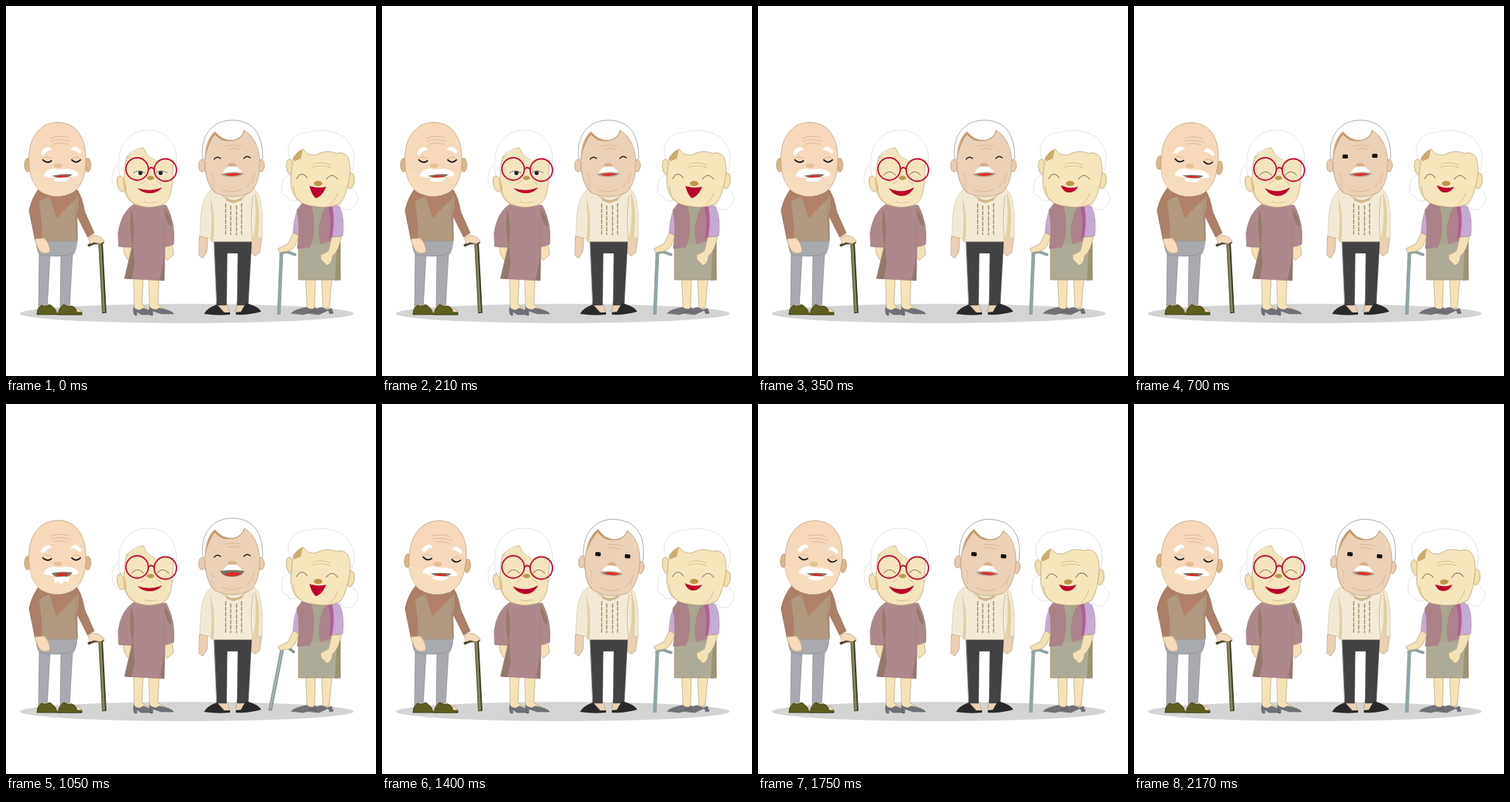
Animation, 512 px wide and 512 px high, one loop 2450 ms. Source, as an HTML page:

```html
<!DOCTYPE html>
<html lang="en">
<head>
<meta charset="utf-8">
<title>Four grandparents</title>
<style>
  html, body { margin: 0; width: 100%; height: 100%; overflow: hidden; background: #fff; }
  svg { display: block; width: 100vw; height: 100vh; }
  path, ellipse, circle { stroke-linecap: round; stroke-linejoin: round; }
  .edge { stroke: #b09a70; stroke-width: .7; }
  .line { fill: none; stroke: #a58a62; stroke-width: .8; }
  .wrinkle { fill: none; stroke: #d3b68e; stroke-width: .9; }
  .lash { fill: none; stroke: #1d1b18; stroke-width: 1.8; }
  .squint { fill: none; stroke: #85795a; stroke-width: 1.1; }
  .white { fill: #fff; }
  .hair { fill: #fff; stroke: #dcdcdc; stroke-width: .8; }
  .red { fill: #bd0029; }
  .shaft { fill: none; stroke-linecap: butt; }
</style>
</head>
<body>
<svg viewBox="0 0 512 512">
  <ellipse cx="250" cy="425.5" rx="231" ry="13.3" fill="#d4d4d4"/>

  <!-- Man with a cane -->
  <g>
    <g fill="#a8aab0" stroke="#85878d" stroke-width=".7">
      <path d="M42 321L98 322Q99 337 92 345L88 416H75L76 346L61 345L57 416H45L46 344Q41 334 42 321Z"/>
      <path d="M47 344Q68 349 91 343" fill="none"/>
    </g>
    <path d="M46 414H57L72 422V426H46ZM76 414H88L104 421V426H76Z" fill="#f5dabb" class="edge"/>
    <g fill="#5c5e20" stroke="#30320e" stroke-width=".8">
      <path d="M43 426Q43 418 49 414Q55 417 60 413Q68 417 70 424L72 427H43Z"/>
      <path d="M72 427Q73 417 80 413Q87 417 91 415Q98 418 98 424L105 424V427Z"/>
    </g>
    <path d="M48 250Q36 263 32 283L40 323L52 322L49 297L48 325L99 325L98 290L113 320L122 314L109 285Q104 258 96 252Z" fill="#ab7f68" stroke="#8d6b57" stroke-width=".7"/>
    <path d="M46 272Q50 266 60 264L70 293L100 263Q101 280 97 292L99 325H48L49 297Z" fill="#b19a81"/>
    <path d="M60 262L71 293L101 259Q75 270 60 262Z" fill="#b08168"/>
    <path d="M46 270Q41 291 49 301L50 322M98 263Q94 288 98 324" class="line"/>
    <path d="M40 322L53 321Q61 329 61 340Q56 344 49 341Q42 335 40 322Z" fill="#f5dabb" class="edge"/>
    <path class="shaft" d="M131 329L136 425" stroke="#35351f" stroke-width="6"/>
    <path class="shaft" d="M130.5 329L135.5 424" stroke="#88845c" stroke-width="3.4"/>
    <path d="M115 331L122 328L134 327" fill="none" stroke="#4b4a2d" stroke-width="4"/>
    <path d="M114 321L121 317Q132 318 136 326L130 329L122 327L117 329Z" fill="#f5dabb" class="edge"/>
    <g data-tilt="0 0 5 0 5 5" data-pivot="70 280">
      <g fill="#d9b588" class="edge">
        <ellipse cx="30" cy="220" rx="4.5" ry="9.5"/>
        <ellipse cx="113" cy="220" rx="4.5" ry="9.5"/>
      </g>
      <path d="M72 161C96 161 108 180 110 203C112 228 107 249 92 258Q71 269 50 258C35 248 30 227 32 203C34 180 48 161 72 161Z" fill="#f5d9ba" class="edge"/>
      <path d="M33 226Q48 234 71 232Q94 234 109 226Q105 249 92 258Q71 268 50 258Q36 249 33 226Z" fill="#f5dcbd"/>
      <path d="M61 183Q74 178 87 182M62 187Q75 183 89 187M65 191Q75 188 85 191" class="wrinkle"/>
      <path class="white" d="M48 205Q50 196 59 195L64 199Q56 200 53 206ZM105 203Q102 195 93 195L89 199Q98 200 102 205Z"/>
      <path class="lash" d="M51 213Q57 219 63 214M91 213Q97 219 103 213"/>
      <path d="M50 211Q57 207 63 211M91 211Q97 207 103 211" class="wrinkle"/>
      <ellipse cx="72" cy="221" rx="6" ry="3.3" fill="#e6c195"/>
      <path class="white" d="M52 235Q54 226 66 225Q75 227 84 225Q98 226 101 234Q91 238 78 235Q64 240 52 235Z"/>
      <g data-on="012 45">
        <path d="M63 235Q77 232 92 233Q87 238 77 238Q70 238 63 235Z" fill="#777568"/>
        <path d="M68 236Q77 233 87 235Q78 239 68 236Z" fill="#d92a26"/>
        <path class="white" d="M65 240Q77 236 88 238Q86 244 76 243Q69 244 65 240Z"/>
      </g>
      <g data-on="3">
        <path d="M63 234Q77 231 92 233Q89 240 77 240Q67 240 63 234Z" fill="#77786e"/>
        <path d="M68 236Q77 232 87 235Q79 241 68 236Z" fill="#dc2a26"/>
        <path class="white" d="M66 241Q77 237 88 240L86 247L81 245L77 249L72 246L68 248Z"/>
      </g>
    </g>
  </g>

  <!-- Woman with glasses -->
  <g>
    <path d="M177 376H190L188 413L199 422H178ZM198 376H212L210 413L222 421H199Z" fill="#f5e3b7" class="edge"/>
    <path d="M177 417Q183 424 190 418Q202 422 203 427H187L181 423V428H178Q175 423 177 417ZM199 417Q206 423 212 418Q229 421 232 426H215L203 422V428H200Q197 423 199 417Z" fill="#707078" stroke="#5d5e66" stroke-width=".6"/>
    <path d="M163 333H174L176 351L170 353L164 344ZM220 333L230 332L232 344L223 352L219 347Z" fill="#f5e0b6" class="edge"/>
    <path d="M176 275Q159 286 155 315L156 333L174 334L164 377L219 380L220 333L232 330Q235 301 222 276Z" fill="#ad888d" stroke="#98807a" stroke-width=".7"/>
    <path d="M173 281Q180 300 176 330L178 357L174 378L164 377L175 334Q170 305 173 281Z" fill="#92796a"/>
    <path d="M219 279Q228 289 229 306Q221 301 219 279ZM219 330L219 380L212 379Q219 358 219 330Z" fill="#92796a"/>
    <path class="line" d="M173 284Q179 309 174 335M220 282Q216 306 220 333"/>
    <path class="hair" d="M164 218Q149 217 147 233Q145 256 164 258Z"/>
    <path class="hair" d="M157 232C151 194 168 172 197 172C223 172 237 189 236 219L232 245H164Z"/>
    <ellipse cx="159" cy="246" rx="5" ry="11" transform="rotate(-12 159 246)" fill="#f3e0b4" class="edge"/>
    <path d="M164 228Q163 202 188 195Q204 210 232 213L230 246Q228 275 210 277Q194 281 177 274Q162 261 163 238Z" fill="#f5e5bc" class="edge"/>
    <path d="M163 237Q169 253 166 260Q174 274 187 276Q172 276 165 260Q161 249 163 237Z" fill="#dfc28d"/>
    <path class="white" d="M163 212Q169 189 191 181Q221 185 235 214Q216 209 206 214Q195 209 190 196Q174 201 163 212Z"/>
    <path d="M165 211Q175 198 190 196Q195 209 206 213" class="wrinkle"/>
    <g data-on="0">
      <ellipse cx="185" cy="231" rx="7" ry="3.4" fill="#fffaf0"/>
      <ellipse cx="215" cy="231" rx="7" ry="3.4" fill="#fffaf0"/>
      <circle cx="186" cy="231" r="2.9" fill="#26211c"/>
      <circle cx="214" cy="231" r="2.9" fill="#26211c"/>
      <path d="M177 231Q185 225 192 231M207 231Q215 225 223 231" class="squint"/>
    </g>
    <path data-on="12345" class="squint" d="M174 234Q182 225 190 234M209 234Q217 225 225 234"/>
    <ellipse cx="200" cy="238" rx="5" ry="3" fill="#bd994f"/>
    <path class="wrinkle" d="M187 246Q190 243 193 243M208 243Q213 244 215 247M191 271Q199 274 209 271"/>
    <path data-on="0 3" class="red" d="M182 252Q199 258 216 251Q210 259 199 259Q188 259 182 252Z"/>
    <path data-on="12 45" class="red" d="M181 252Q199 261 216 251Q210 263 198 263Q187 262 181 252Z"/>
    <g fill="none" stroke="#c10735" stroke-width="1.8">
      <circle cx="181.5" cy="225.5" r="15.5"/>
      <circle cx="220.5" cy="227" r="15.5"/>
      <path d="M197 226Q201 221 205 226"/>
    </g>
  </g>

  <!-- Man in a pullover -->
  <g>
    <path d="M268 319L279 321L278 340L272 349L267 345ZM340 321L354 319L351 341L345 346L338 341Z" fill="#ebd0b4" class="edge"/>
    <path d="M292 410H305L310 425H284ZM320 410H333L338 424H318Z" fill="#ead0b4" class="edge"/>
    <path d="M288 322H340L335 414H320L321 342H306L305 414H292Z" fill="#424245" stroke="#39393b" stroke-width=".6"/>
    <path d="M274 426Q278 418 292 413L302 424L310 424V427Q292 429 274 426ZM318 424L325 423L332 411Q350 416 353 423Q336 428 318 427Z" fill="#29292a"/>
    <path d="M284 254Q272 264 270 285L268 318L283 322L284 326H341L342 321L354 321Q357 288 350 262L343 252Z" fill="#f2ead7" stroke="#d3c5a4" stroke-width=".7"/>
    <path d="M282 264Q291 287 287 325H283Q286 288 282 264ZM344 258Q353 273 349 320L342 321Q348 289 344 258Z" fill="#e0d0a5"/>
    <path d="M342 263Q337 293 341 324M299 263Q315 277 334 260" class="wrinkle"/>
    <path class="shaft" d="M304 273V317M311 276V317M319 276V317M326 273V317" stroke="#a8946f" stroke-width="1.6" stroke-dasharray="6 1.5"/>
    <path d="M302 262Q315 276 331 261L326 269L315 273L306 270Z" fill="#d0b78d"/>
    <g data-tilt="0 0 0 0 5.5 5.5" data-pivot="300 277">
      <path d="M272 208C269 179 286 158 313 158C342 158 356 178 355 211L350 230H276Z" fill="#fff" stroke="#949496" stroke-width=".8"/>
      <ellipse cx="271" cy="221" rx="4.5" ry="8.5" fill="#e8cbb0" class="edge"/>
      <ellipse cx="353" cy="221" rx="4.5" ry="8.5" fill="#e8cbb0" class="edge"/>
      <path d="M275 212Q276 185 289 174Q301 188 315 186Q327 183 330 172Q348 183 351 211Q352 246 338 258Q313 270 289 258Q275 246 275 212Z" fill="#ebd1b8" class="edge"/>
      <path d="M276 209Q278 184 289 174Q299 186 310 187Q299 189 289 178Q280 189 276 209ZM277 232Q279 249 290 257Q280 252 277 232Z" fill="#c59a68"/>
      <path d="M301 184Q308 187 315 186Q327 183 330 172" class="line"/>
      <path class="wrinkle" d="M304 194Q315 191 326 194M307 198Q315 196 323 198M283 231Q287 234 287 240M284 244L288 249M344 232Q340 238 341 245M338 244L334 251M299 254Q313 260 326 254"/>
      <path data-on="01 3" class="lash" d="M288 212Q292 207 297 211M329 211Q333 206 338 210" style="stroke-width:1.4"/>
      <g data-on="2 45" fill="#17140f">
        <rect x="288.5" y="205.5" width="7.5" height="5.5" rx="1.5"/>
        <rect x="329.5" y="204.5" width="7.5" height="5.5" rx="1.5"/>
      </g>
      <ellipse cx="313" cy="220" rx="6" ry="2.8" fill="#d3b18d"/>
      <path class="white" d="M300 231Q303 222 313 222Q323 222 326 230Q314 228 300 231Z"/>
      <g data-on="012 45">
        <path d="M297 233Q312 228 330 232Q323 237 313 236Q304 237 297 233Z" fill="#a3a19a"/>
        <path d="M302 233Q313 230 326 232Q314 238 302 233Z" fill="#e22c24"/>
      </g>
      <g data-on="3">
        <path d="M296 231Q313 229 330 231Q326 239 314 239Q301 240 296 231Z" fill="#74736a"/>
        <path d="M301 236Q313 230 326 235Q314 241 301 236Z" fill="#de2b25"/>
      </g>
    </g>
  </g>

  <!-- Laughing woman -->
  <g>
    <path d="M415 376H428L427 419H417ZM437 377H451L447 418H439Z" fill="#f5e3b7" class="edge"/>
    <path d="M395 425Q399 420 416 417Q424 423 428 417L429 426L426 422L412 427ZM417 425Q423 420 437 417Q444 423 450 418L453 425L448 426L446 421L433 427Z" fill="#717077" stroke="#5d5d65" stroke-width=".6"/>
    <path d="M405 319H461L463 379H405Z" fill="#adaa98" stroke="#a8895f" stroke-width=".7"/>
    <path d="M458 330L463 325L463 379L455 380Z" fill="#9d9273"/>
    <path d="M412 271Q400 282 398 304L397 318L407 322L454 322L466 318Q469 294 462 278L449 270Z" fill="#c6aad1" stroke="#b39bb8" stroke-width=".7"/>
    <path d="M421 277H447V330H420Z" fill="#aaa493"/>
    <path d="M410 272L423 278Q430 313 420 334L403 336Q407 302 402 283Z" fill="#aa828a"/>
    <path d="M443 277L451 272Q455 292 451 325L435 329Q429 299 443 277Z" fill="#ad828e"/>
    <path d="M449 272Q457 292 451 319L447 321Q452 294 445 276Z" fill="#b35b99"/>
    <path d="M404 281Q411 303 403 334M423 278Q430 313 420 335M443 278Q430 301 435 329" class="line"/>
    <g data-on="012 45" fill="none">
      <path class="shaft" d="M381 344L377.5 427" stroke="#a99e7d" stroke-width="5"/>
      <path class="shaft" d="M381 344L377.5 426" stroke="#83aab3" stroke-width="3.4"/>
      <path d="M380 343L388 340L400 344" stroke="#91a6a5" stroke-width="4"/>
    </g>
    <g data-on="3" fill="none">
      <path class="shaft" d="M382 340L365.5 424" stroke="#777f7a" stroke-width="5"/>
      <path class="shaft" d="M382 340L365.5 423" stroke="#9eb2b2" stroke-width="3.4"/>
      <path d="M380 338L390 337L398 343" stroke="#849692" stroke-width="4"/>
    </g>
    <path d="M398 314L405 318Q402 334 392 339L379 341L376 336L390 329Z" fill="#f5e1b7" class="edge"/>
    <path d="M451 320L464 319Q461 338 452 346Q451 357 444 359L436 351L435 345L446 339Z" fill="#f5e1b7" class="edge"/>
    <g data-tilt="0 0 0 0 0 -4" data-pivot="440 285">
      <path class="hair" d="M392 234Q379 238 382 250Q378 261 390 265Q393 273 404 268ZM469 250Q482 251 483 258Q491 265 484 274Q479 285 468 281L458 272Z"/>
      <path class="hair" d="M393 211Q387 198 394 188Q401 174 418 175Q436 169 452 175Q471 178 478 195Q485 209 479 228L469 240H397Z"/>
      <ellipse cx="393" cy="223" rx="5" ry="11" transform="rotate(-8 393 223)" fill="#f2dfb0" class="edge"/>
      <ellipse cx="477" cy="242" rx="5" ry="11" transform="rotate(8 477 242)" fill="#f2dfb0" class="edge"/>
      <path d="M397 212Q400 203 411 198Q418 208 429 206Q444 198 457 204Q468 201 473 209Q477 218 476 232Q472 260 463 273Q446 282 420 276Q396 272 394 244Z" fill="#f5e6bc" class="edge"/>
      <path d="M411 198L408 211L399 215L397 211Q402 202 411 198Z" fill="#ccad70"/>
      <path class="wrinkle" d="M425 219Q437 214 448 220M424 223Q438 219 450 224M398 249Q397 264 408 271M459 259Q456 270 448 275"/>
      <path class="squint" d="M402 239Q409 227 417 238M443 240Q451 229 459 240"/>
      <ellipse cx="432" cy="245.5" rx="6" ry="3.5" fill="#bd9648"/>
      <path data-on="0 3" class="red" d="M420 249Q431 253 443 250Q438 263 429 266Q423 262 420 249Z"/>
      <path data-on="12 45" class="red" d="M419 248Q431 254 443 250Q438 259 429 258Q422 257 419 248Z"/>
    </g>
  </g>
</svg>
<script>
const STEP = 350, LOOP = 2450, LAST = 5;
const switched = [...document.querySelectorAll("[data-on]")];
const heads = [...document.querySelectorAll("[data-tilt]")].map(el => ({
  el, angles: el.dataset.tilt.split(" "), pivot: el.dataset.pivot
}));
let shown = -1;

function pose(step) {
  for (const el of switched) el.style.display = el.dataset.on.includes(step) ? "" : "none";
  for (const { el, angles, pivot } of heads) el.setAttribute("transform", `rotate(${angles[step]} ${pivot})`);
}

function tick() {
  const step = Math.min(LAST, Math.floor(performance.now() % LOOP / STEP));
  if (step !== shown) pose(shown = step);
  requestAnimationFrame(tick);
}
tick();
</script>
</body>
</html>
```
